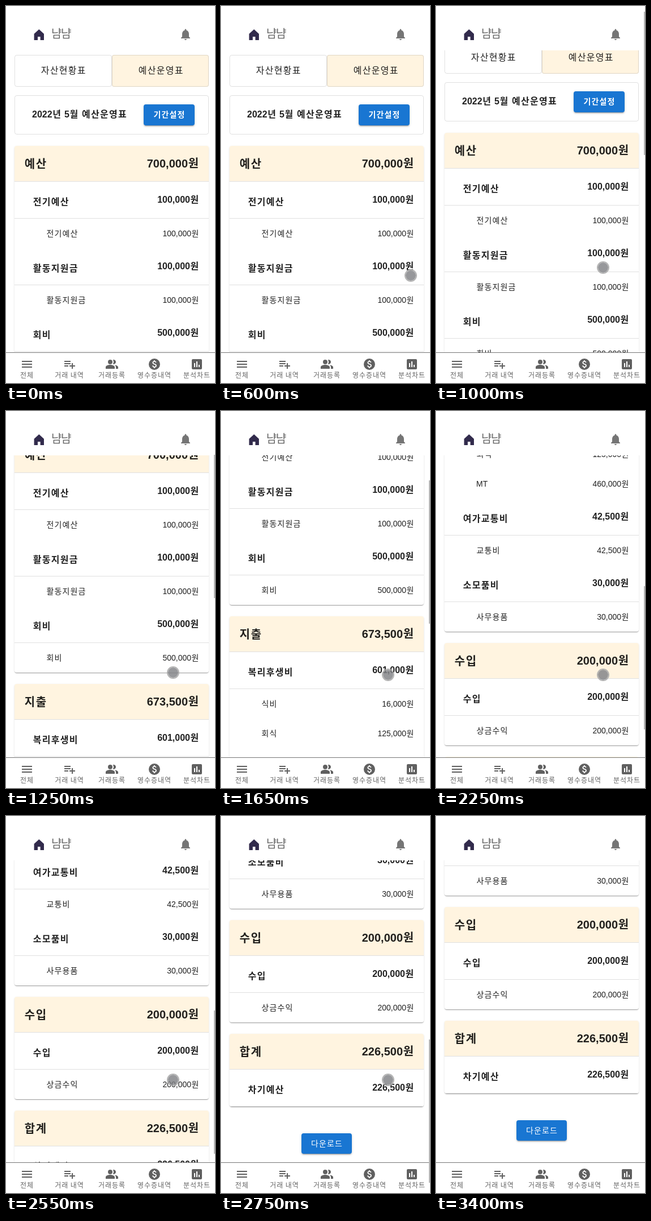
Recreate the animation shown at these times as an HTML page. Size 369x663 px, loop 3750 ms.

```html
<!DOCTYPE html>
<html lang="ko">
<head>
<meta charset="utf-8">
<style>
  html, body { margin: 0; width: 100%; height: 100%; overflow: hidden; background: #fff; }
  body { position: relative; color: rgba(0,0,0,.87); font: 16px/24px "Liberation Sans", "Noto Sans CJK KR", "Noto Sans CJK", sans-serif; }
  div, svg, .text { position: absolute; box-sizing: border-box; white-space: nowrap; }
  .ko { position: relative; left: .04em; letter-spacing: .08em; }
  #page { left: 0; top: 0; width: 369px; height: 1721px; }
  .box { border: 1px solid rgba(0,0,0,.12); border-radius: 4px; }
  .cream { background: #fff4e0; }
  .card { left: 15px; width: 343px; border-radius: 4px; overflow: hidden; background: #fff;
    box-shadow: 0 2px 1px -1px rgba(0,0,0,.2), 0 1px 1px rgba(0,0,0,.14), 0 1px 3px rgba(0,0,0,.12); }
  .row { left: 0; width: 100%; }
  .line { border-bottom: 1px solid #e0e0e0; }
  .button { background: #1976d2; border-radius: 4px; color: #fff; font-size: 14px; line-height: 36px; text-align: center;
    box-shadow: 0 3px 1px -2px rgba(0,0,0,.2), 0 2px 2px rgba(0,0,0,.14), 0 1px 5px rgba(0,0,0,.12); }
  .bold { font-weight: 700; }
  #header { left: 0; top: 0; width: 369px; height: 78px; background: #fff; color: #666; }
  #title { left: 80px; top: 37px; font-size: 20px; }
  #title .ko { left: 0; letter-spacing: -1.4px; }
  #nav { left: 0; top: 609px; width: 369px; height: 54px; background: #fff; border-top: 1px solid #777; color: #666; }
  .tab { font-size: 12px; text-align: center; }
  .tab svg { left: 25.5px; top: 0; }
  .tab .text { left: 0; width: 100%; top: 20px; }
  #thumb { left: 367px; width: 2px; height: 252px; background: #b8b8b8; }
  #cursor { width: 22px; height: 22px; border-radius: 50%; background: rgba(128,130,134,.82); border: 2px solid rgba(172,172,172,.9); background-clip: padding-box; }
</style>
</head>
<body>
<div id="page"></div>
<div id="header">
  <svg style="left:48px;top:40px" width="21" height="21" fill="#322b4c"><path d="M10.3 1 1.600 9v11H8v-6h4.600v6H19V9z"/></svg>
  <span id="title" class="text"></span>
</div>
<div id="nav"></div>
<div id="thumb"></div>
<div id="cursor"></div>
<script>
const $ = id => document.getElementById(id);
const page = $('page');

const korean = s => s.replace(/[가-힣]+/g, '<span class="ko">$&</span>');
const icon = (path, color, style = '') =>
  `<svg width="24" height="24" viewBox="0 0 24 24" fill="${color}" style="${style}"><path d="${path}"/></svg>`;

function add(parent, className, left, top, width, height, html = '') {
  const el = document.createElement('div');
  el.className = className;
  Object.assign(el.style, { left: left + 'px', top: top + 'px', width: width + 'px', height: height + 'px' });
  el.innerHTML = html;
  parent.append(el);
  return el;
}

const text = (s, style, bold) => `<span class="text${bold ? ' bold' : ''}" style="${style}">${korean(s)}</span>`;

// Top of the page
add(page, 'box', 15, 86, 172, 56, text('자산현황표', 'left:45px;top:15px'));
add(page, 'box cream', 187, 86, 171, 56, text('예산운영표', 'left:45px;top:15px'));
add(page, 'box', 15, 157, 343, 69, text('2022년 5월 예산운영표', 'left:30px;top:21px;word-spacing:1px', true));
add(page, 'button bold', 243, 173, 90, 37, korean('기간설정'));
add(page, 'button', 142, 1593, 89, 36, korean('다운로드'));

// Row levels: 0 card heading, 1 category, 2 item
const LEVELS = [
  { height: 63, size: 20, left: 17, label: 20, amount: 19, style: 'row line cream', bold: true },
  { height: 65, size: 16, left: 32, label: 24, amount: 20, style: 'row line', bold: true },
  { height: 52, size: 14, left: 56, label: 14, amount: 14, style: 'row', bold: false },
];
const CARDS = [
  [[0, '예산', '700,000'], [1, '전기예산', '100,000'], [2, '전기예산', '100,000'],
   [1, '활동지원금', '100,000'], [2, '활동지원금', '100,000'], [1, '회비', '500,000'], [2, '회비', '500,000']],
  [[0, '지출', '673,500'], [1, '복리후생비', '601,000'], [2, '식비', '16,000'], [2, '회식', '125,000'],
   [2, 'MT', '460,000'], [1, '여가교통비', '42,500'], [2, '교통비', '42,500'],
   [1, '소모품비', '30,000'], [2, '사무용품', '30,000']],
  [[0, '수입', '200,000'], [1, '수입', '200,000'], [2, '상금수익', '200,000']],
  [[0, '합계', '226,500'], [1, '차기예산', '226,500']],
];
let cardTop = 246;
for (const rows of CARDS) {
  const card = add(page, 'card', 15, cardTop, 343, 0);
  let y = 0;
  for (const [level, label, amount] of rows) {
    const l = LEVELS[level];
    add(card, l.style, 0, y, 343, l.height,
      text(label, `left:${l.left}px;top:${l.label}px;font-size:${l.size}px`, l.bold) +
      text(amount + '원', `right:17px;top:${l.amount}px;font-size:${l.size}px`, l.bold));
    y += l.height;
  }
  card.style.height = y + 'px';
  cardTop += y + 20;
}

// Fixed bars
$('title').innerHTML = korean('냠냠');
const BELL = 'M12 22c1.1 0 2-.9 2-2h-4c0 1.1.9 2 2 2zm6-6v-5c0-3.07-1.64-5.64-4.5-6.32V4c0-.83-.67-1.5-1.5-1.5s-1.5.67-1.5 1.5v.68C7.63 5.36 6 7.92 6 11v5l-2 2v1h16v-1l-2-2z';
$('header').insertAdjacentHTML('beforeend', icon(BELL, '#757575', 'left:305px;top:38px'));
const TABS = [
  ['전체', 'M3 18h18v-2H3zm0-5h18v-2H3zm0-7v2h18V6z'],
  ['거래 내역', 'M14 10H3v2h11zm0-4H3v2h11zm4 8v-4h-2v4h-4v2h4v4h2v-4h4v-2zM3 16h7v-2H3z'],
  ['거래등록', 'M16.67 13.13C18.04 14.06 19 15.32 19 17v3h4v-3c0-2.18-3.57-3.47-6.33-3.87zM9 4a4 4 0 1 0 0 8 4 4 0 0 0 0-8zm6 8a4 4 0 1 0-1.33-7.76C14.5 5.27 15 6.58 15 8s-.5 2.73-1.33 3.76c.42.14.86.24 1.33.24zM9 13c-2.67 0-8 1.34-8 4v3h16v-3c0-2.66-5.33-4-8-4z'],
  ['영수증내역', 'M12 2a10 10 0 1 0 0 20 10 10 0 0 0 0-20zm.88 15.76V19h-1.75v-1.29c-.74-.18-2.39-.77-3.02-2.96l1.65-.67c.06.22.58 2.09 2.4 2.09.93 0 1.98-.48 1.98-1.61 0-.96-.7-1.46-2.28-2.03-1.1-.39-3.35-1.03-3.35-3.31 0-.1.01-2.4 2.62-2.96V5h1.75v1.24c1.84.32 2.51 1.79 2.66 2.23l-1.58.67c-.11-.35-.59-1.34-1.9-1.34-.7 0-1.81.37-1.81 1.39 0 .95.86 1.31 2.64 1.9 2.4.83 3.01 2.05 3.01 3.45 0 2.63-2.5 3.13-3.02 3.22z'],
  ['분석차트', 'M19 3H5a2 2 0 0 0-2 2v14a2 2 0 0 0 2 2h14a2 2 0 0 0 2-2V5a2 2 0 0 0-2-2zM9 17H7v-7h2zm4 0h-2V7h2zm4 0h-2v-4h2z'],
];
TABS.forEach(([label, path], i) => add($('nav'), 'tab', i * 75 - 1, 8, 75, 46, icon(path, '#606060') + text(label, '')));

// Motion: [time, value...] points joined by straight lines
const SCROLL = [[950, 0], [1000, 23], [1050, 62], [1150, 150], [1200, 185], [1250, 200],
  [1400, 200], [1450, 208], [1550, 255], [1650, 319], [1700, 370], [1750, 400],
  [1950, 400], [2000, 440], [2100, 598], [2200, 750], [2300, 870], [2350, 900],
  [2600, 900], [2650, 930], [2750, 1035], [2800, 1058]];
const CURSOR = [[550, 365, 486], [600, 335, 474], [650, 310, 464], [700, 295, 460], [1400, 295, 460],
  [1450, 295, 464], [3000, 295, 464], [3050, 301, 490], [3200, 357, 651]];

function at(track, t) {
  const i = track.findIndex(p => p[0] > t);
  if (i === 0) return track[0].slice(1);
  if (i < 0) return track.at(-1).slice(1);
  const a = track[i - 1], b = track[i], k = (t - a[0]) / (b[0] - a[0]);
  return a.slice(1).map((v, n) => v + (b[n + 1] - v) * k);
}

const LOOP = 3750, STEP = 50;
const start = performance.now();
function draw() {
  const elapsed = Math.max(0, performance.now() - start) % LOOP;
  const t = Math.floor(elapsed / STEP) * STEP;
  const scroll = Math.round(at(SCROLL, t)[0]);
  const [x, y] = at(CURSOR, t);
  page.style.top = -scroll + 'px';
  $('thumb').style.top = Math.round(1.3 + scroll * .3787) + 'px';
  $('thumb').style.opacity = t < 1000 ? 0 : Math.max(0, Math.min(1, (3400 - t) / 150));
  $('cursor').style.left = x - 11 + 'px';
  $('cursor').style.top = y - 11 + 'px';
  $('cursor').style.visibility = t >= 550 && t < 3250 ? 'visible' : 'hidden';
  requestAnimationFrame(draw);
}
draw();
</script>
</body>
</html>
```
